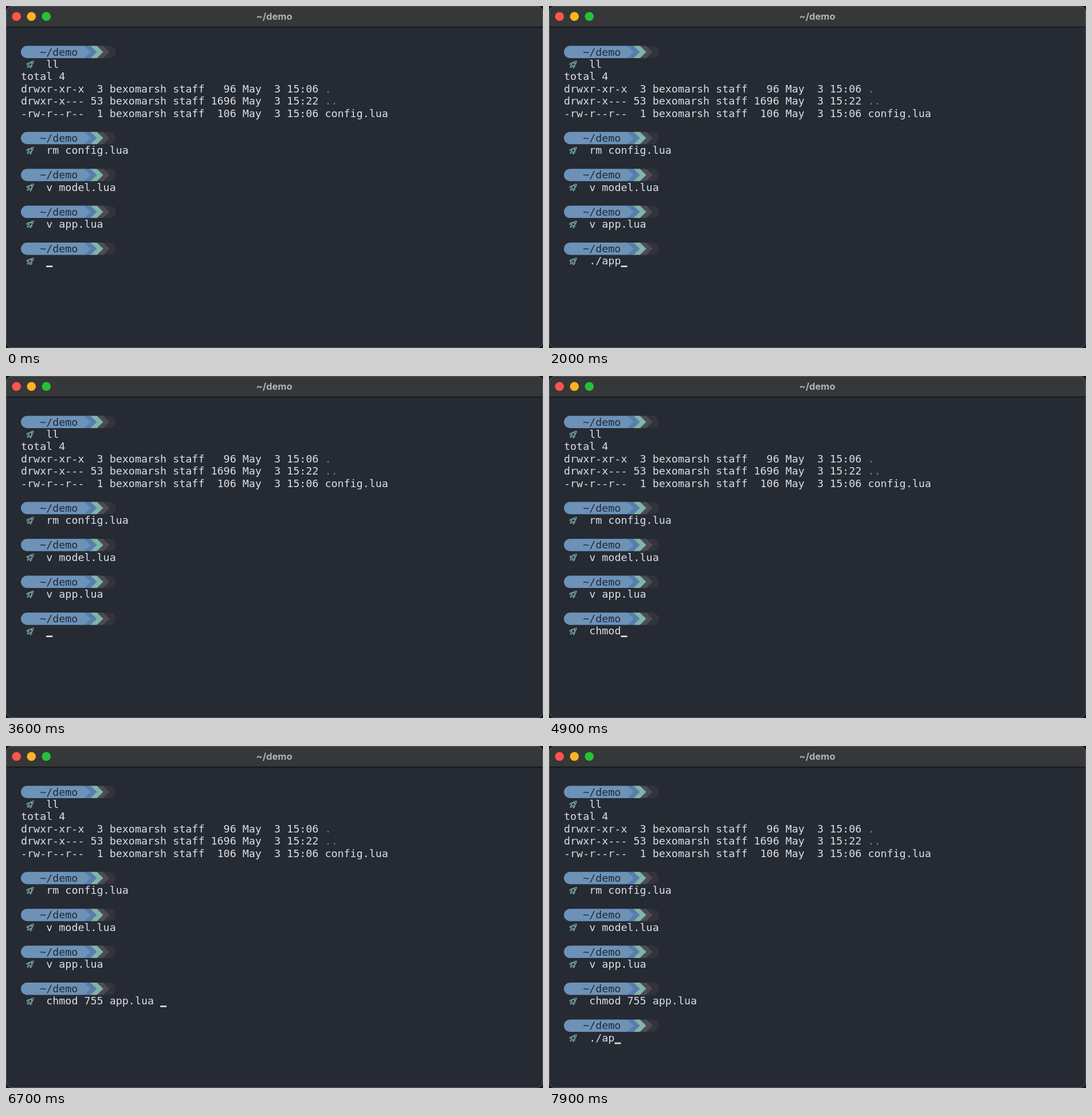
An HTML page with a canvas that plays this animation: 937x597 px, repeating every 8000 ms.

```html
<!DOCTYPE html>
<html lang="en">
<head>
<meta charset="utf-8">
<title>~/demo</title>
<style>
html, body { margin: 0; width: 100%; height: 100%; overflow: hidden; background: #15171b; }
canvas { display: block; width: 937px; height: 597px; }
</style>
</head>
<body>
<canvas id="stage"></canvas>
<script>
const W = 937, H = 597, LOOP = 8000;
const LEFT = 26, TOP = 69.5, CELL = 11.05, ROW = 21.47, BASE = 17;
const MONO = '18.35px "DejaVu Sans Mono", monospace';
const INK = '#dbdfe7', BG = '#252a33', BLUE = '#6d92b8';
const ARROWS = [BLUE, '#587eae', '#81b5a8', '#4b4b58', '#33333e'];

const canvas = document.getElementById('stage');
const ctx = canvas.getContext('2d');
const dpr = window.devicePixelRatio || 1;
canvas.width = W * dpr;
canvas.height = H * dpr;

// Each step: time in ms, text on the active command line.
const FIRST = [
  [0, ''], [1300, '.'], [1500, './'], [1700, './a'], [1800, './ap'], [2000, './app'],
  [2900, './ap'], [3100, './a'], [3200, './'], [3300, '.'], [3400, ''],
  [4000, 'c'], [4100, 'ch'], [4600, 'chm'], [4700, 'chmo'], [4900, 'chmod'],
  [5000, 'chmod '], [5200, 'chmod 7'], [5400, 'chmod 75'], [5600, 'chmod 755'],
  [5700, 'chmod 755 '], [6300, 'chmod 755 a'], [6400, 'chmod 755 ap'],
  [6600, 'chmod 755 app'], [6700, 'chmod 755 app.lua ']
];
const SECOND = [[0, ''], [7500, '.'], [7700, './'], [7800, './a'], [7900, './ap']];
const ENTER = 7000;

const HISTORY = [[0, 'll'], [7, 'rm config.lua'], [10, 'v model.lua'], [13, 'v app.lua']];
const LISTING = [
  'total 4',
  'drwxr-xr-x  3 bexomarsh staff   96 May  3 15:06',
  'drwxr-x--- 53 bexomarsh staff 1696 May  3 15:22',
  '-rw-r--r--  1 bexomarsh staff  106 May  3 15:06 config.lua'
];

const colX = c => LEFT + c * CELL;
const rowY = r => TOP + r * ROW;
const typed = (steps, t) => steps.filter(s => s[0] <= t).pop()[1];

// Words are placed on the character grid.
function write(text, col, row, color = INK) {
  ctx.font = MONO;
  ctx.textAlign = 'left';
  ctx.textBaseline = 'alphabetic';
  ctx.fillStyle = color;
  for (const m of text.matchAll(/\S+/g)) {
    ctx.fillText(m[0], colX(col + m.index), rowY(row) + BASE);
  }
}

function disc(x, y, r, color) {
  ctx.fillStyle = color;
  ctx.beginPath();
  ctx.arc(x, y, r, 0, Math.PI * 2);
  ctx.fill();
}

function badge(row) {
  const y = rowY(row), mid = y + ROW / 2, end = y + ROW;
  // Right to left, so each arrow covers the base of the next one.
  for (let i = 4; i >= 0; i--) {
    const x = colX(10 + i), tip = x + CELL;
    const start = i ? x - CELL : colX(1);
    ctx.fillStyle = ARROWS[i];
    ctx.beginPath();
    ctx.moveTo(start, y);
    ctx.lineTo(x, y);
    if (i === 4) ctx.ellipse(x, mid, CELL, ROW / 2, 0, -Math.PI / 2, Math.PI / 2);
    else ctx.lineTo(tip, mid);
    ctx.lineTo(x, end);
    ctx.lineTo(start, end);
    if (!i) ctx.ellipse(start, mid, CELL, ROW / 2, 0, Math.PI / 2, Math.PI * 1.5);
    ctx.fill();
  }
  write('~/demo', 3, row, '#202934');
}

function rocket(row) {
  ctx.save();
  ctx.translate(42.6, rowY(row) + 10.6);
  ctx.rotate(Math.PI / 4);
  ctx.strokeStyle = '#86bdb5';
  ctx.lineWidth = 1.15;
  ctx.lineJoin = ctx.lineCap = 'round';
  ctx.stroke(new Path2D(
    'M0-7.6C2.7-5 2.9-1 2 3H-2C-2.9-1-2.7-5 0-7.6Z' +
    'M-2.6-1L-4.7 1.5V4.8L-2 3M2.6-1L4.7 1.5V4.8L2 3' +
    'M-1.3 4.6Q-1.2 6.5 0 7.6Q1.2 6.5 1.3 4.6'));
  ctx.beginPath();
  ctx.arc(0, -2.8, 0.9, 0, Math.PI * 2);
  ctx.stroke();
  ctx.restore();
}

function prompt(row, text) {
  badge(row);
  rocket(row + 1);
  write(text, 4, row + 1);
}

function cursor(row, length) {
  ctx.fillStyle = INK;
  ctx.fillRect(colX(4 + length), rowY(row + 1) + ROW - 2.8, CELL, 2.7);
}

function frame() {
  ctx.fillStyle = '#15171b';
  ctx.fillRect(0, 0, W, H);
  ctx.save();
  ctx.beginPath();
  ctx.roundRect(0, 0, W, H, 11);
  ctx.clip();
  ctx.fillStyle = BG;
  ctx.fillRect(0, 0, W, H);
  ctx.fillStyle = '#363738';
  ctx.fillRect(0, 0, W, 36);
  ctx.fillStyle = '#0c0e11';
  ctx.fillRect(0, 36, W, 1.3);
  ctx.restore();
  ctx.strokeStyle = '#5c5f64';
  ctx.lineWidth = 1;
  ctx.beginPath();
  ctx.roundRect(0.5, 0.5, W - 1, H - 1, 10.5);
  ctx.stroke();

  ['#ff544d', '#ffb324', '#25c138'].forEach((c, i) => disc(18.3 + i * 26, 18.2, 7.8, c));
  ctx.font = '700 16.5px Inter, sans-serif';
  ctx.textAlign = 'center';
  ctx.textBaseline = 'alphabetic';
  ctx.fillStyle = '#b2b3b4';
  ctx.fillText('~/demo', 468, 23.5);
}

function draw(t) {
  ctx.setTransform(dpr, 0, 0, dpr, 0, 0);
  frame();
  HISTORY.forEach(([row, text]) => prompt(row, text));
  LISTING.forEach((line, i) => write(line, 0, 2 + i));
  write('.', 48, 3, '#6288a9');
  write('..', 48, 4, '#6288a9');

  const command = typed(FIRST, t);
  prompt(16, command);
  if (t < ENTER) {
    cursor(16, command.length);
  } else {
    const next = typed(SECOND, t);
    prompt(19, next);
    cursor(19, next.length);
  }
}

function tick() {
  draw(performance.now() % LOOP);
  requestAnimationFrame(tick);
}
tick();
</script>
</body>
</html>
```
